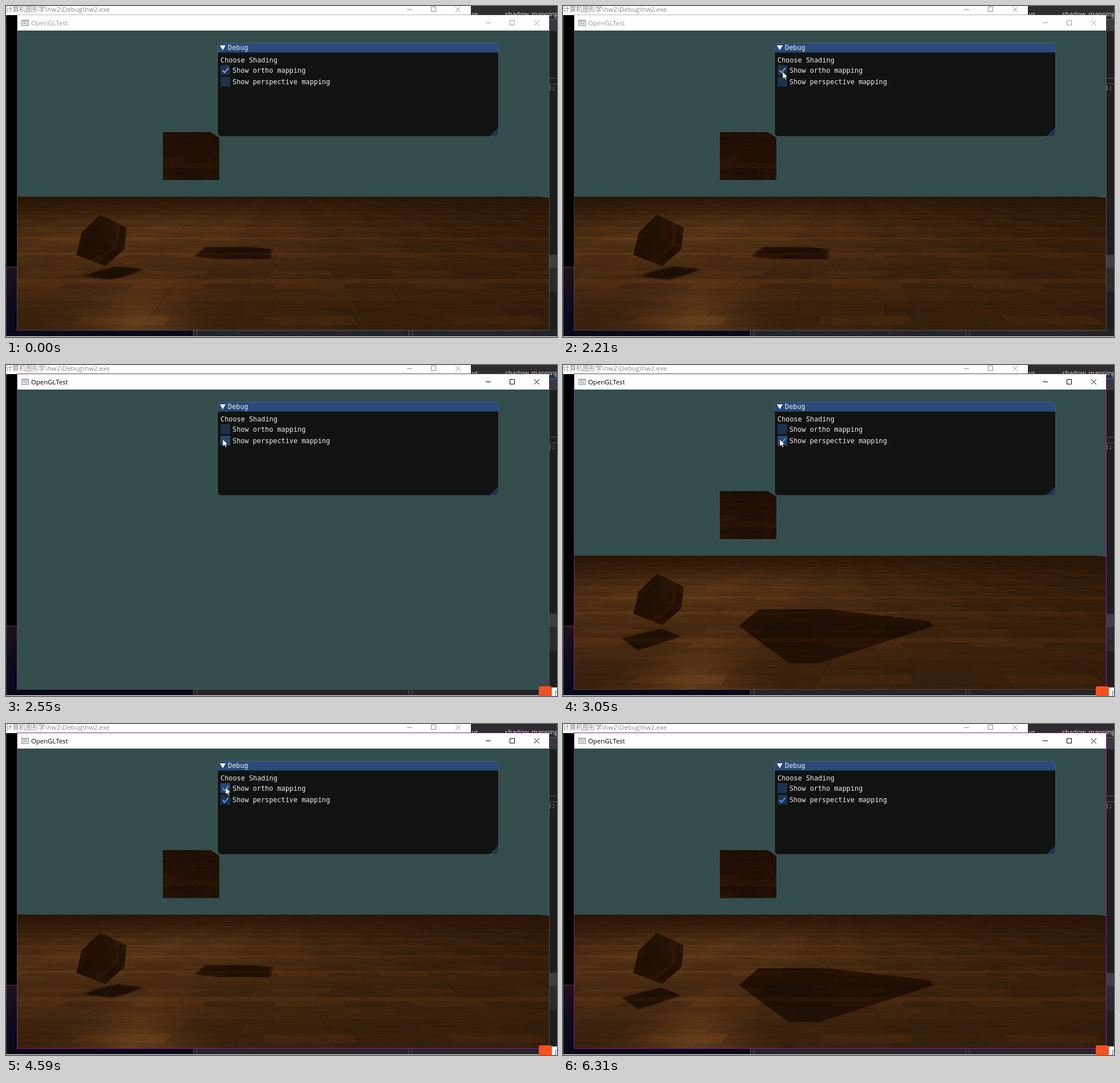
Animation, 966 px wide and 580 px high, one loop 7690 ms. Source, as an HTML page with a canvas:

```html
<!DOCTYPE html>
<html lang="en">
<head>
<meta charset="utf-8">
<title>Shadow mapping demo</title>
<style>
  html, body { margin: 0; width: 100%; height: 100%; overflow: hidden; background: #000; }
  svg, canvas { position: absolute; left: 0; top: 0; display: block; }
  canvas { left: 20px; top: 43px; visibility: hidden; }
  text { white-space: pre; }
  .ui { font: 11.4px "Open Sans", "Noto Sans CJK SC", "Noto Sans CJK", sans-serif; }
  .mono { font: 11.85px "DejaVu Sans Mono", monospace; fill: #eee; }
</style>
</head>
<body>
<svg width="966" height="580" viewBox="0 0 966 580">
  <defs>
    <linearGradient id="night" x1="0" y1="0" x2="0" y2="1">
      <stop offset="0" stop-color="#21101d"/>
      <stop offset=".6" stop-color="#0b0a1d"/>
      <stop offset="1" stop-color="#090919"/>
    </linearGradient>
  </defs>
  <rect width="966" height="580"/>
  <!-- editor behind -->
  <rect x="814" width="152" height="44" fill="#2d2d30"/>
  <rect x="952" y="24" width="14" height="20" fill="#38383d"/>
  <rect x="952" y="23" width="14" height="1.5" fill="#1c6ca8"/>
  <rect x="952" y="44" width="14" height="536" fill="#1e1e1e"/>
  <path d="M952 126.5h14M952 136.5h14" stroke="#56565a"/>
  <rect x="952" y="436" width="14" height="23" fill="#3e3e42"/>
  <rect x="952" y="459" width="14" height="42" fill="#2a2a2d"/>
  <g class="ui" fill="#e4e4e4">
    <text x="817" y="18">vs</text>
    <text x="875" y="18">shadow_mapping</text>
  </g>
  <text x="951" y="147" font-family="DejaVu Sans Mono, monospace" font-size="10" fill="#999">);</text>
  <!-- desktop strip -->
  <rect y="457" width="328" height="123" fill="url(#night)"/>
  <path d="M.5 16V580M0 457.5H20" stroke="#4c4650" fill="none"/>
  <rect x="328" y="568" width="638" height="12" fill="#252528"/>
  <path d="M328.5 568v10M334.5 568v10M706.5 568v10M712.5 568v10" stroke="#55555a"/>
  <path d="M0 578.5H966" stroke="#3f3f46"/>
  <path d="M0 579.5H966" stroke="#f0f0f0"/>
  <!-- console title bar -->
  <rect width="815" height="16" fill="#fff"/>
  <text class="ui" x="0" y="10" fill="#888">计算机图形学\hw2\Debug\hw2.exe</text>
  <path d="M703 6.5h9M745.5 1.5h8v8h-8zM788 1.5l9 9m0-9l-9 9" fill="none" stroke="#888"/>
  <rect x="20" y="43" width="932" height="525" fill="#334d4d"/>
</svg>
<canvas id="ortho" width="932" height="525"></canvas>
<canvas id="persp" width="932" height="525"></canvas>
<svg width="966" height="580" viewBox="0 0 966 580">
  <rect x="20" y="16" width="932" height="27" fill="#fff"/>
  <rect id="frame" x="19.5" y="15.5" width="933" height="553" fill="none"/>
  <g fill="none" stroke="#8f979c">
    <rect x="27.5" y="24.5" width="12" height="10" fill="#e4e8ea"/>
    <path d="M27 26.5h13M30 32l2-4 2 4M36 29v4"/>
  </g>
  <g id="caption">
    <text class="ui" x="44" y="33.5" fill="currentColor">OpenGLTest</text>
    <path d="M841 29.5h9M883.5 25.5h8v8h-8zM926 25l9 9m0-9l-9 9" fill="none" stroke="currentColor"/>
  </g>
  <!-- debug panel -->
  <rect x="371" y="65" width="492.5" height="164" rx="6.5" fill="#111312"/>
  <path d="M371 81.5V71.5a6.5 6.5 0 0 1 6.5-6.5H857a6.5 6.5 0 0 1 6.5 6.5V81.5z" fill="#294a7a"/>
  <path d="M847 229l16.5-16.5V222.5a6.5 6.5 0 0 1-6.5 6.5z" fill="#1d3650"/>
  <rect x="371" y="65" width="492.5" height="163.5" rx="6.5" fill="none" stroke="#6e6e80" stroke-opacity=".5"/>
  <path d="M375 69h10l-5 8.5z" fill="#fff"/>
  <g class="mono">
    <text x="389" y="77">Debug</text>
    <text x="376" y="98.5">Choose Shading</text>
    <text x="397" y="117">Show ortho mapping</text>
    <text x="397" y="137">Show perspective mapping</text>
  </g>
  <rect id="box0" x="376" y="103.5" width="17" height="17.5"/>
  <rect id="box1" x="376" y="124" width="17" height="17"/>
  <path id="tick0" d="M379.5 112.5l3.5 4 7-8" fill="none" stroke-width="2.2"/>
  <path id="tick1" d="M379.5 133l3.5 4 7-8" fill="none" stroke-width="2.2"/>
  <!-- input bar -->
  <g id="bar">
    <rect x="957" y="565" width="9" height="15" fill="#f4f6f8"/>
    <path d="M963.5 580v-8h3" fill="none" stroke="#3c6ea8"/>
    <rect x="934" y="563" width="23" height="22" rx="3" fill="#f4511e"/>
  </g>
  <path id="cursor" d="M0 0V12.5L2.9 9.9 4.9 14.2 6.9 13.3 5 9.2H8.8Z" fill="#fff" stroke="#000" stroke-width=".6"/>
</svg>
<script>
const $ = id => document.getElementById(id);
const LOOP = 7690;

// ---------- scene: floor y = -0.5, camera at EYE looking along -z ----------
const W = 932, H = 525, FOCAL = 633, EYE = [0, 1, 8], LAMP = [-4, 4, -2], DROP = 1.5;
const BASE = [0.686, 0.47, 0.235];
const dot = (a, b) => a[0] * b[0] + a[1] * b[1] + a[2] * b[2];
const sub = (a, b) => [a[0] - b[0], a[1] - b[1], a[2] - b[2]];
const unit = a => { const n = Math.hypot(...a); return a.map(v => v / n); };
const hash = (i, j) => { const s = Math.sin(i * 127.1 + j * 311.7) * 43758.5; return s - Math.floor(s); };

const cubes = [
  { at: [-2, 1.5, 0], half: 0.5, axes: [[1, 0, 0], [0, 1, 0], [0, 0, 1]] },
  // turned 60 degrees about (1, 0, 1)
  { at: [-3, 0, 2], half: 0.25,
    axes: [[0.75, 0.612, 0.25], [-0.612, 0.5, 0.612], [0.25, -0.612, 0.75]] }
];

// parquet: eight rows of staggered boards with grain
const N = 256, wood = new Float32Array(N * N);
for (let y = 0; y < N; y++) for (let x = 0; x < N; x++) {
  const row = y >> 5, s = x / N * 2 + hash(row, 9), a = x / N * 10, i = Math.floor(a);
  const grain = hash(i, y + 50) * (1 - a + i) + hash((i + 1) % 10, y + 50) * (a - i);
  let tone = 0.91 + 0.18 * hash(row * 7, Math.floor(s) % 2 + 3) + (grain - 0.5) * 0.13;
  if (y % 32 < 1) tone *= 0.92;
  if (s % 1 < 0.012) tone *= 0.9;
  wood[y * N + x] = tone;
}
const sample = (u, v) => wood[(Math.floor(v * N) & 255) * N + (Math.floor(u * N) & 255)];

// slab test; gives distance and the axis of the entry face
function hit(cube, from, dir) {
  const rel = sub(from, cube.at);
  let near = -1e9, far = 1e9, side = 0;
  for (let i = 0; i < 3; i++) {
    const p = dot(cube.axes[i], rel), q = dot(cube.axes[i], dir);
    const a = (-cube.half - p) / q, b = (cube.half - p) / q;
    const lo = Math.min(a, b);
    if (lo > near) { near = lo; side = i; }
    far = Math.min(far, Math.max(a, b));
  }
  return near < far && far > 0.001 ? { near, side } : null;
}

function shadowAt(x, z, mode) {
  if (x < -4.5 || x > 2 || z < -1 || z > 4.2 || x + z > mode.limit) return 0;
  const p = [x, -0.5, z], dir = mode.sun || sub(LAMP, p);
  return cubes.some(c => hit(c, p, dir)) ? 1 : 0;
}

function softShadow(x, z, mode) {
  const r = mode.soft;
  return (shadowAt(x - r, z - r, mode) + shadowAt(x + r, z - r, mode) +
          shadowAt(x - r, z + r, mode) + shadowAt(x + r, z + r, mode)) / 4;
}

function light(p, normal) {
  const l = unit(sub(LAMP, p)), v = unit(sub(EYE, p));
  const h = unit([l[0] + v[0], l[1] + v[1], l[2] + v[2]]);
  const diffuse = Math.max(dot(normal, l), 0);
  return 0.3 * (diffuse + (diffuse && Math.max(dot(normal, h), 0) ** 64));
}

function cubePixel(dir) {
  for (const c of cubes) {
    const found = hit(c, EYE, dir);
    if (!found) continue;
    const p = EYE.map((e, i) => e + dir[i] * found.near), rel = sub(p, c.at);
    const [u, v] = [[2, 1], [0, 2], [0, 1]][found.side]
      .map(i => dot(c.axes[i], rel) / c.half / 2 + 0.5);
    const axis = c.axes[found.side], flip = dot(axis, dir) > 0 ? -1 : 1;
    return [sample(u, v), light(p, axis.map(a => a * flip))];
  }
  return null;
}

function floorPixel(sx, sy, mode) {
  const depth = FOCAL * DROP / sy;
  if (sy <= 0 || depth > 33 || sy < 29 + (sx - 452) * 0.13) return null;
  const x = sx * depth / FOCAL, z = 8 - depth, step = depth / sy;
  let tone = 0;
  for (let i = 0; i < 6; i++) tone += sample(x / 2, (z + ((i + 0.5) / 6 - 0.5) * step) / 2) / 6;
  return [tone, light([x, -0.5, z], [0, 1, 0]) * (1 - softShadow(x, z, mode))];
}

function render(id, mode) {
  const ctx = $(id).getContext("2d"), img = ctx.createImageData(W, H);
  for (let y = 0, o = 0; y < H; y++) for (let x = 0; x < W; x++, o += 4) {
    const sx = x + 0.5 - W / 2, sy = y + 0.5 - H / 2;
    const px = (x < 360 && x > 100 && cubePixel([sx / FOCAL, -sy / FOCAL, -1])) ||
               floorPixel(sx, sy, mode);
    for (let i = 0; i < 3; i++) {
      const c = px && BASE[i] * px[0];
      img.data[o + i] = px ? 255 * (0.3 * c * c + px[1] * c) : [51, 77, 77][i];
    }
    img.data[o + 3] = 255;
  }
  ctx.putImageData(img, 0, 0);
}

render("ortho", { sun: [-2, 4, -1], soft: 0.025, limit: Infinity });
render("persp", { soft: 0.006, limit: 3.37 });

// ---------- timeline ----------
// time, then cursor tip
const moves = [
  [0], [310, 281, 328], [480, 359, 252], [650, 371, 184], [810, 395, 119], [960, 406, 87],
  [1160, 385, 114], [2210, 385, 115], [2550, 380, 130], [3910, 382, 124], [4070, 382, 116],
  [4260, 384, 111], [4420, 385, 111], [5610, 395, 106], [5800, 668, 23], [5960, 716, 27],
  [6120, 733, 41], [6310]
];
// time, ticks, hovered box, shown scene
const states = [
  [0, [1, 0], -1, "ortho"], [2350, [1, 0], 0, "ortho"], [2550, [0, 0], 1, ""],
  [3050, [0, 1], 1, "persp"], [4070, [0, 1], 0, "persp"], [4590, [1, 1], 0, "ortho"],
  [5300, [0, 1], 0, "persp"], [5800, [0, 1], -1, "persp"]
];
const latest = (list, t) => list.filter(e => e[0] <= t).pop();
const show = (id, on) => { $(id).style.visibility = on ? "visible" : "hidden"; };

function draw(t) {
  const [, x, y] = latest(moves, t);
  show("cursor", x !== undefined);
  if (x !== undefined) $("cursor").setAttribute("transform", `translate(${x} ${y})`);

  const [, ticks, hover, scene] = latest(states, t);
  const focused = t >= 2350, pressed = t >= 2350 && t < 2550;
  show("ortho", scene === "ortho");
  show("persp", scene === "persp");
  ticks.forEach((on, i) => {
    show("tick" + i, on);
    $("tick" + i).setAttribute("stroke", focused ? "#4296fa" : "#6fa6da");
    $("box" + i).setAttribute("fill", hover !== i ? "#1e314a" : pressed ? "#316bae" : "#25476f");
  });
  show("bar", focused);
  $("caption").style.color = focused ? "#000" : "#999";
  $("frame").setAttribute("stroke", focused ? "#7a2a80" : "rgba(120,120,120,.55)");
}

const start = performance.now();
function tick() {
  draw((performance.now() - start) % LOOP);
  requestAnimationFrame(tick);
}
tick();
</script>
</body>
</html>
```
